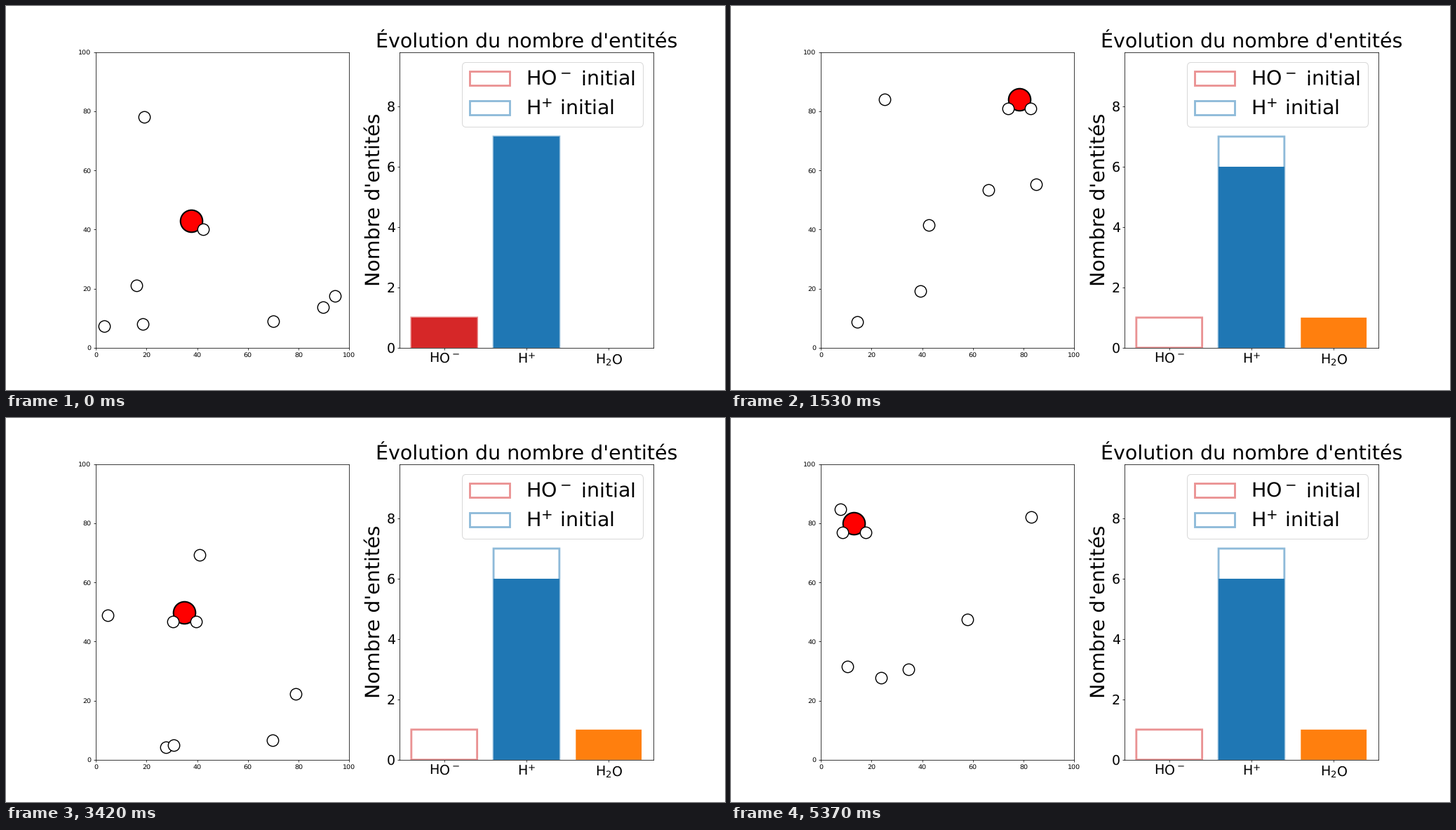
Recreate the animation shown at these times as a matplotlib script. Size 1025 by 547 pixels, loop 5400 ms.

```python
import numpy as np
import matplotlib.pyplot as plt
from matplotlib.animation import FuncAnimation

plt.rcParams["text.hinting"] = "none"

W, H, DPI = 1025, 547, 1025 / 15
LOOP_MS, STEP_MS = 5400, 30
CYCLE = 90          # the reaction plays twice per loop
REACT = 12          # step at which HO- captures an H+
BIG, SMALL = 30, 20

# starting points of the free H+; the last one reacts
START = [(19, 78.1), (3.4, 7.3), (18.6, 8), (89.6, 13.8), (15.9, 21.2), (94.3, 17.5), (69.9, 9.1)]
# a few places the oxygen passes, by step
OXYGEN = {0: (37.7, 43), 20: (37.1, 27.1), 51: (78.4, 83.9), 89: (13.1, 80)}
BOND = np.array([4.5, -3.0])
MIRROR = np.array([-1, 1])

rng = np.random.default_rng(7)


def fold(p, lo, hi):
    """Reflect positions between two walls."""
    span = hi - lo
    return lo + span - np.abs((p - lo) % (2 * span) - span)


def steps(n, size):
    return rng.uniform(-size, size, (n, 2))


def roam(start):
    """Free random walk between the walls."""
    path = np.vstack([start, steps(CYCLE - 1, 10)]).cumsum(axis=0)
    return fold(path, 2.4, 97.6)


def bridge(stops, size, margin):
    """Random walk that passes through the given stops."""
    times, points = list(stops), np.array(list(stops.values()), float)
    parts = [points[:1]]
    for n, a, b in zip(np.diff(times), points, points[1:]):
        d = steps(n, size)
        parts.append(a + (d + (b - a - d.sum(axis=0)) / n).cumsum(axis=0))
    return fold(np.concatenate(parts), margin, 100 - margin)


oxygen = bridge(OXYGEN, 8, 5)
partner = oxygen + BOND * MIRROR
partner[:REACT + 1] = bridge({0: START[-1], REACT: partner[REACT]}, 8, 2.4)
free = [roam(p) for p in START[:-1]]
hydrogen = np.stack(free + [partner, oxygen + BOND], axis=1)

# a hair above the integer size guards against rounding down
fig, (box, chart) = plt.subplots(
    1, 2, dpi=DPI, figsize=((W + 1e-3) / DPI, (H + 1e-3) / DPI))

box.set(xlim=(0, 100), ylim=(0, 100))
o_dot = box.scatter([], [], s=33.2 ** 2, c="red", edgecolors="black", linewidths=2.2, zorder=2)
h_dots = box.scatter([], [], s=17.3 ** 2, c="white", edgecolors="black", linewidths=1.5, zorder=3)

COLORS = ["tab:red", "tab:blue", "tab:orange"]
bars = chart.bar(range(3), [1, 7, 0], color=COLORS, snap=False)
for i, (count, name) in enumerate([(1, "HO$^-$ initial"), (7, "H$^{+}$ initial")]):
    chart.bar(i, count, fill=False, edgecolor=COLORS[i], linewidth=3, alpha=0.5,
              label=name, snap=False)
chart.set(xlim=(-0.54, 2.54), ylim=(0, 9.8), yticks=range(0, 10, 2))
chart.set_xticks(range(3), ["HO$^-$", "H$^{+}$", "H$_2$O"])
chart.tick_params(labelsize=SMALL)
chart.set_ylabel("Nombre d'entités", fontsize=BIG)
chart.set_title("Évolution du nombre d'entités", fontsize=BIG)
chart.legend(fontsize=BIG, loc="upper right")


def update(n):
    t = n % CYCLE
    o_dot.set_offsets(oxygen[t:t + 1])
    h_dots.set_offsets(hydrogen[t])
    done = int(t >= REACT)
    for bar, height in zip(bars, (1 - done, 7 - done, done)):
        bar.set_height(height)
    return [o_dot, h_dots, *bars]


anim = FuncAnimation(fig, update, frames=LOOP_MS // STEP_MS, interval=STEP_MS,
                     repeat=True, repeat_delay=0, blit=False)
plt.show()
```
